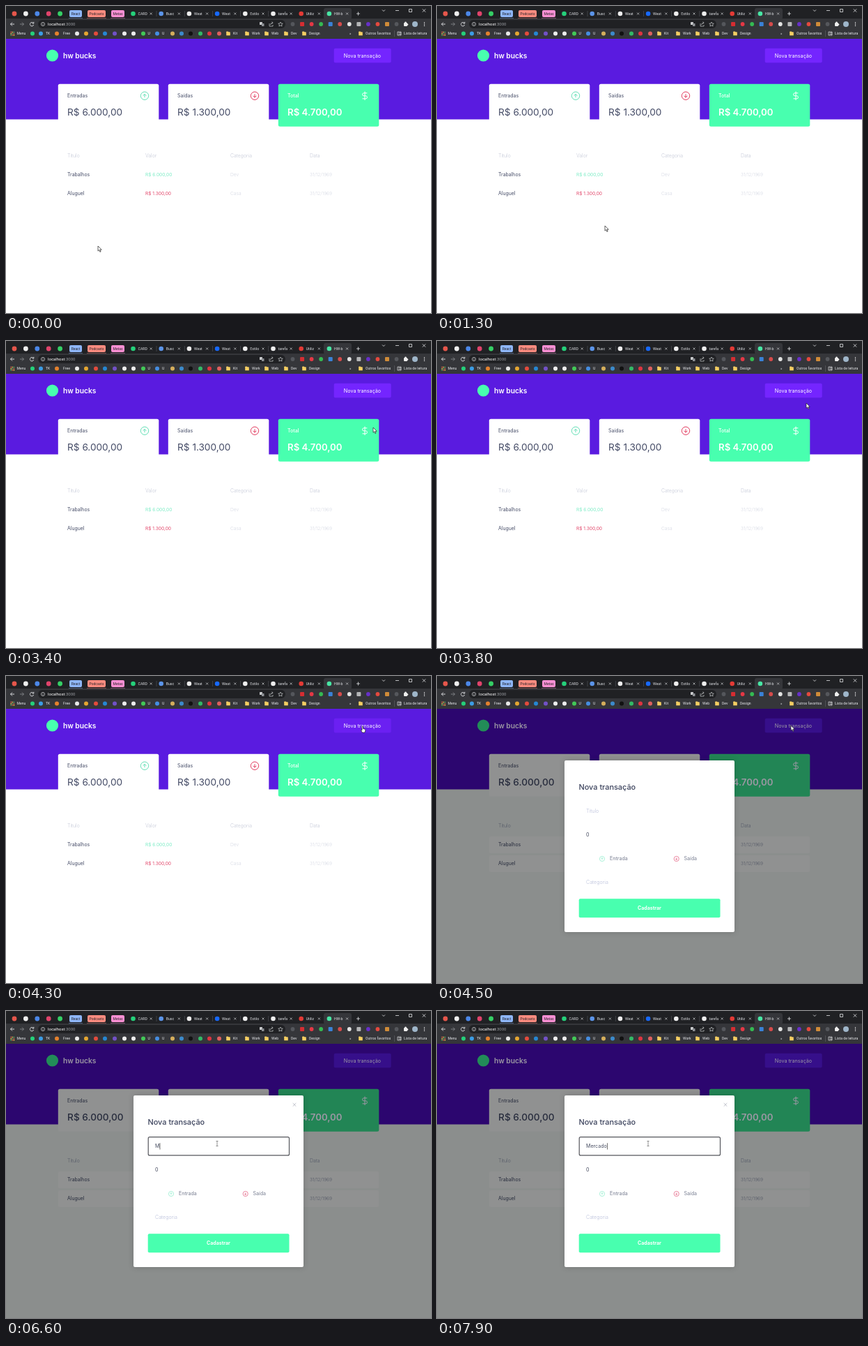
These frames come from a looping animation (610x440 px, 8 s). An HTML page with a canvas:

```html
<!DOCTYPE html>
<html lang="pt">
<head>
<meta charset="utf-8">
<style>
html, body { margin: 0; width: 100%; height: 100%; overflow: hidden; background: #fff; }
canvas { display: block; }
</style>
</head>
<body>
<canvas id="stage" width="610" height="440"></canvas>
<script>
const ctx = document.getElementById('stage').getContext('2d');
const LOOP = 8000, OPEN = 4500, FOCUS = 5300;
const UI = 'Roboto, sans-serif', PAGE = 'Inter, sans-serif';

const BRIGHT = {
  header: '#5a1be0', body: '#fff', card: '#fff', total: '#48ffaf', button: '#7425ff', hover: '#6b20f2',
  logo: '#48ffaf', white: '#fff', ink: '#444b66', soft: '#c4c8d7', faint: '#d5d8e3',
  income: '#7eebc6', expense: '#e2476a', valueWeight: 400
};
const DIM = {
  header: '#2c066f', body: '#8b8e8d', card: '#909191', total: '#228555', button: '#360f8a', hover: '#360f8a',
  logo: '#228c58', white: '#9c98a4', ink: '#262b3c', soft: '#555a68', faint: '#535866',
  income: '#228c58', expense: '#842a44', valueWeight: 500
};

function rect(x, y, w, h, color, r = 0) {
  ctx.fillStyle = color;
  ctx.beginPath();
  ctx.roundRect(x, y, w, h, r);
  ctx.fill();
}
function dot(x, y, r, color) {
  ctx.fillStyle = color;
  ctx.beginPath();
  ctx.arc(x, y, r, 0, Math.PI * 2);
  ctx.fill();
}
function ring(x, y, r, color, width = 1) {
  ctx.strokeStyle = color;
  ctx.lineWidth = width;
  ctx.beginPath();
  ctx.arc(x, y, r, 0, Math.PI * 2);
  ctx.stroke();
}
function stroke(path, color, width = .8) {
  ctx.strokeStyle = color;
  ctx.lineWidth = width;
  ctx.stroke(new Path2D(path));
}
function text(s, x, y, size, color, weight = 400, family = PAGE, align = 'left') {
  ctx.font = `${weight} ${size}px ${family}`;
  ctx.fillStyle = color;
  ctx.textAlign = align;
  ctx.fillText(s, x, y);
  return ctx.measureText(s).width;
}
function cross(x, y, r, color, width) {
  stroke(`M${x - r} ${y - r}L${x + r} ${y + r}M${x + r} ${y - r}L${x - r} ${y + r}`, color, width);
}
function arrowIcon(x, y, r, color, dir) {
  const a = r * .42, width = r > 5 ? 1 : .7;
  ring(x, y, r, color, width);
  stroke(`M${x} ${y - a}V${y + a}M${x - a} ${y}L${x} ${y + dir * a}L${x + a} ${y}`, color, width);
}

function drawTabs() {
  rect(0, 0, 610, 18, '#202124');
  ['#e5564b', '#eee', '#4b87e8', '#e0436b', '#35cf65'].forEach((c, i) => dot(12 + i * 16.4, 11, 3.4, c));
  const groups = [['React', 91, 18, '#8fb7fb'], ['Podcasts', 117, 26, '#ff8c80'], ['Metas', 151, 19, '#fb90d4']];
  for (const [name, x, w, color] of groups) {
    rect(x, 6, w, 10, color, 2);
    rect(x - 1, 17.6, w + 2, .8, color);
    text(name, x + w / 2, 12.8, 5, '#25262a', 400, UI, 'center');
  }
  rect(456, 3, 40, 16, '#35363a', 3);
  const tabs = [['CARD', '#25d07a'], ['Busc', '#5b94e8'], ['Weat', '#eee'], ['Weat', '#1769ff'],
    ['Estilo', '#eee'], ['tarefa', '#eee'], ['Utiliz', '#e33a35'], ['HW-b', '#48e6a4']];
  tabs.forEach(([name, color], i) => {
    const x = 182.5 + i * 40.2;
    dot(x, 11, 3.3, color);
    ctx.save();
    ctx.beginPath();
    ctx.rect(x + 7, 4, 14, 13);
    ctx.clip();
    text(name, x + 7, 13, 5.2, '#dfe1e5', 400, UI);
    ctx.restore();
    cross(x + 25.7, 11, 1.5, '#d0d2d5', .7);
    if (i > 0 && i < 6) rect(x - 7, 7, .6, 8, '#55575c');
  });
  stroke('M503 11H508M505.500 8.500V13.500M559 6.500H564', '#e4e5e8');
  stroke('M540 5.500L542 7.500L544 5.500', '#e4e5e8');
  stroke('M578.500 4.500H582.500V8.500H578.500Z', '#e4e5e8');
  cross(600, 6.5, 2.2, '#e4e5e8', .8);
}

function drawToolbar() {
  rect(0, 18, 610, 29, '#35363a');
  rect(46, 20, 355, 12, '#202124', 6);
  stroke('M12 26H6.500M9 23.500L6.500 26L9 28.500', '#e4e5e8', .9);
  stroke('M20 26H25.500M23 23.500L25.500 26L23 28.500', '#85878c', .9);
  stroke('M39.300 24.500A2.700 2.700 0 1 0 39.700 27M39.800 22.800V25H37.500', '#e4e5e8', .9);
  ring(53, 26, 2.6, '#d4d6d9', .7);
  stroke('M53 25.500V27.500M53 24.200V24.800', '#d4d6d9', .7);
  const w = text('localhost', 60, 28, 6, '#fff', 400, UI);
  text(':3000', 60 + w, 28, 6, '#9a9da2', 400, UI);

  rect(364, 23, 4, 4, '#c8cacc', .5);
  rect(367, 25, 3.5, 4, '#8d9095', .5);
  stroke('M378 25V29H383V27M379.500 27Q380 24 383 24M381.500 22.500L383.200 24L381.500 25.500', '#c8cacc', .7);
  stroke('M394 23L395 25L397.300 25.200L395.600 26.700L396.100 29L394 27.800L391.900 29L392.400 26.700L390.700 25.200L393 25Z', '#c8cacc', .7);

  const extensions = ['#55575c', '#d52d32', '#e53845', '#35bb52', '#3a82d8', '#d54b4b', '#e4e4e4', '#b4b5b7',
    '#6730c9', '#e4493e', '#cf8b38', '#55575c'];
  extensions.forEach((c, i) => i % 3 === 1
    ? rect(408.5 + i * 13.55, 23, 6, 6, c, 1)
    : dot(411.5 + i * 13.55, 26, 2.9, c));
  rect(571, 24, 5, 5, '#eee', 1);
  dot(573.5, 24, 1.4, '#eee');
  dot(576, 26.5, 1.3, '#eee');
  dot(587, 26, 4, '#9fb6ca');
  for (const y of [23.8, 26, 28.2]) dot(600.5, y, .7, '#eee');
}

function folder(x) {
  rect(x - 2.8, 36.5, 3, 2, '#f5ce62', .5);
  rect(x - 2.8, 37.3, 5.6, 5, '#f5ce62', .6);
}

function drawBookmarks() {
  const label = (s, x) => text(s, x, 41.4, 5.1, '#e8eaed', 400, UI);
  const appColors = ['#e9574d', '#f4c34d', '#4caf68'];
  for (let i = 0; i < 9; i++) {
    const row = Math.floor(i / 3);
    rect(6.5 + i % 3 * 2.1, 36.8 + row * 2.1, 1.5, 1.5, appColors[(i + row) % 3]);
  }
  label('Menu', 15.5);
  const sites = [[38, '#25d07a'], [50, '#3c9ce5'], [73, '#e2802e'], [102, '#e8e8e8'], [115, '#e3a531'],
    [129, '#e24b3d'], [142, '#2687d2'], [156, '#7251c7'], [170, '#eee'], [183, '#eee'], [197, '#42c957'],
    [217, '#458de0'], [239, '#d5ae5b'], [252, '#3c8acb'], [265, '#111'], [279, '#32ba66'], [292, '#df3441'], [306, '#df605f']];
  for (const [x, c] of sites) dot(x, 39.5, 3, c);
  [['TK', 57], ['Free', 82], ['U', 203.5], ['U', 224]].forEach(([s, x]) => label(s, x));
  [['Kit', 319], ['Work', 346], ['Web', 374], ['Dev', 402], ['Design', 428]].forEach(([s, x]) => {
    folder(x);
    label(s, x + 7);
  });
  label('»', 493);
  folder(509);
  label('Outros favoritos', 516);
  rect(557, 35, .7, 9, '#5c5e63');
  stroke('M562 37H567V42H562ZM563.500 38.500H567M563.500 40.500H567', '#e8eaed', .7);
  label('Lista de leitura', 571);
}

function drawCard(x, title, value, c, isTotal) {
  rect(x, 111.7, 144.5, 61, isTotal ? c.total : c.card, 2.5);
  const color = isTotal ? c.white : c.ink;
  text(title, x + 13.3, 131.4, 7, color, isTotal ? 500 : 400);
  text(value, x + 13.3, 157.3, isTotal ? 13.2 : 13.6, color, isTotal ? 600 : c.valueWeight);
}

function drawPage(c, hover) {
  rect(0, 47, 610, 393, c.body);
  rect(0, 47, 610, 115.5, c.header);
  dot(66.5, 71, 8.6, c.logo);
  text('hw bucks', 82, 74.7, 10.2, c.white, 600);
  rect(470.7, 60.7, 82, 20.5, hover ? c.hover : c.button, 2);
  text('Nova transação', 511.5, 73.7, 7.2, c.white, 400, PAGE, 'center');

  drawCard(74.8, 'Entradas', 'R$ 6.000,00', c);
  drawCard(232.8, 'Saídas', 'R$ 1.300,00', c);
  drawCard(390.8, 'Total', 'R$ 4.700,00', c, true);
  arrowIcon(199, 128.7, 5.7, '#63dfb5', -1);
  arrowIcon(357, 128.7, 5.7, '#e2395d', 1);
  stroke('M515 122.500V135M518.300 124.800H513.600A2 2 0 0 0 513.600 128.800H516.400A2 2 0 0 1 516.400 132.800H511.500', c.white, 1);

  const columns = [88, 200, 322, 436];
  ['Título', 'Valor', 'Categoria', 'Data'].forEach((s, i) => text(s, columns[i], 217.3, 6.9, c.soft, 300));
  const rows = [['Trabalhos', 'R$ 6.000,00', 'Dev', c.income], ['Aluguel', 'R$ 1.300,00', 'Casa', c.expense]];
  rows.forEach(([title, value, category, color], i) => {
    const y = 230 + i * 27;
    rect(74.8, y, 460.5, 24, c.card, 2);
    text(title, columns[0], y + 14.4, 6.9, c.ink);
    text(value, columns[1], y + 14.4, 6.6, color);
    text(category, columns[2], y + 14.4, 6.7, c.faint, 300);
    text('31/12/1969', columns[3], y + 14.4, 6.5, c.faint, 300);
  });
}

function typedText(t) {
  const keyTimes = [6600, 6800, 7000, 7400, 7500, 7700, 7900];
  return 'Mercado'.slice(0, keyTimes.filter(k => t >= k).length);
}

function drawModal(t) {
  ctx.save();
  ctx.shadowColor = 'rgba(0,0,0,.18)';
  ctx.shadowBlur = 8;
  rect(183, 121, 244, 246, '#fff', 2);
  ctx.restore();
  if (t >= OPEN + 100) cross(414, 134.3, 2.3, '#a5a8b5', .7);
  text('Nova transação', 203.5, 163.2, 10.9, '#3b425c', 500);

  const typed = typedText(t);
  if (t >= FOCUS) {
    ctx.strokeStyle = '#55565c';
    ctx.lineWidth = 1.2;
    ctx.beginPath();
    ctx.roundRect(204.2, 180.7, 202.3, 26.2, 2);
    ctx.stroke();
  }
  const width = text(typed || 'Título', 214, 196.2, 7.1, typed ? '#4a5064' : '#b9bfda', typed ? 400 : 300);
  const caretOn = t >= FOCUS && (t < 5900 || t >= 6400);
  if (caretOn) rect(typed ? 214.2 + width : 214, 189.3, .7, 9.2, '#333');

  text('0', 214, 230.1, 7.1, '#3d4358');
  arrowIcon(237, 262, 3.6, '#8becca', -1);
  text('Entrada', 248, 264.2, 7.1, '#747a8e');
  arrowIcon(343.7, 262, 3.6, '#e3567a', 1);
  text('Saída', 354.5, 264.2, 7.1, '#747a8e');
  text('Categoria', 214, 298, 7.1, '#b9bfda', 300);
  rect(203.7, 319.3, 202.8, 26.9, '#48ffaf', 2);
  text('Cadastrar', 305, 335.4, 7, '#fff', 700, PAGE, 'center');
}

// Pointer keyframes: time, x, y
const track = [
  [0, 132, 344], [100, 133, 346], [200, 133, 347], [1200, 133, 347], [1300, 241, 315], [2900, 241, 315],
  [3100, 300, 272], [3300, 478, 157], [3400, 527, 124], [3600, 529, 110], [3800, 530, 89], [3900, 531, 74],
  [4000, 529, 68], [4100, 520, 70], [4300, 510, 72], [4500, 508, 71], [4700, 468, 100],
  [4900, 375, 166], [5100, 315, 187], [5300, 303, 190]
];

function pointerAt(t) {
  const next = track.findIndex(p => p[0] > t);
  if (next < 0) return track[track.length - 1].slice(1);
  const [t0, x0, y0] = track[next - 1], [t1, x1, y1] = track[next];
  const k = (t - t0) / (t1 - t0);
  return [x0 + (x1 - x0) * k, y0 + (y1 - y0) * k];
}

const inside = (x, y, left, top, right, bottom) => x > left && x < right && y > top && y < bottom;

function drawPointer(x, y, kind) {
  if (kind === 'beam') {
    stroke(`M${x - 1.5} ${y - 3.5}H${x + 1.5}M${x} ${y - 3.5}V${y + 3.5}M${x - 1.5} ${y + 3.5}H${x + 1.5}`, '#666', .7);
    return;
  }
  const shapes = {
    arrow: 'M0 0V7.200L1.700 5.700L2.900 8.500L4.100 8L2.900 5.300H5.200Z',
    hand: 'M1 .5Q1.800 -.3 2.500 .5V3.500L5.500 4.300Q6 4.600 5.800 6L5 9H1.600L-.7 5.800Q-.3 4.800 1 6Z'
  };
  const shape = new Path2D(shapes[kind]);
  ctx.save();
  ctx.translate(x, y);
  ctx.fillStyle = '#fff';
  ctx.fill(shape);
  ctx.strokeStyle = '#222';
  ctx.lineWidth = .7;
  ctx.stroke(shape);
  ctx.restore();
}

function draw(time) {
  const t = Math.floor(time % LOOP / 100) * 100;
  const open = t >= OPEN;
  const [x, y] = pointerAt(t);
  const hover = !open && inside(x, y, 471, 61, 553, 81);
  drawPage(open ? DIM : BRIGHT, hover);
  drawTabs();
  drawToolbar();
  drawBookmarks();
  if (open) drawModal(t);
  const overInput = open && inside(x, y, 204, 180, 407, 207);
  drawPointer(x, y, hover ? 'hand' : overInput ? 'beam' : 'arrow');
}

const start = performance.now();
function tick() {
  draw(performance.now() - start);
  requestAnimationFrame(tick);
}
tick();
</script>
</body>
</html>
```
